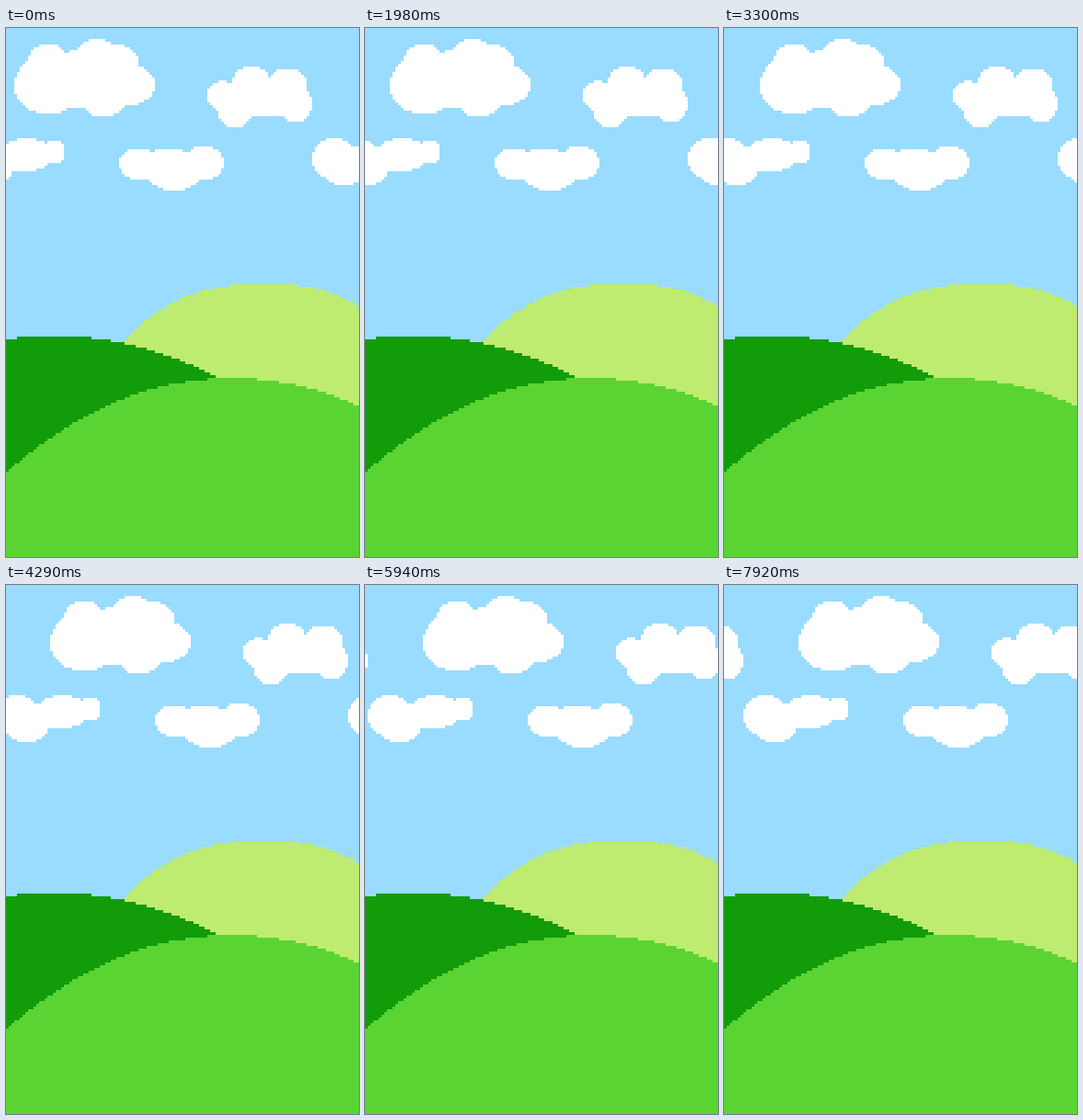
Write an HTML page with a canvas that moves like this. It is 384 by 576 pixels and loops after 8 s.

```html
<!DOCTYPE html>
<html lang="en">
<head>
<meta charset="utf-8">
<title>Drifting clouds</title>
<style>
  html, body { margin: 0; width: 100%; height: 100%; overflow: hidden; background: #99dcff; }
  canvas { display: block; width: 384px; height: 576px; image-rendering: pixelated; }
</style>
</head>
<body>
<canvas id="stage" width="128" height="192"></canvas>
<script>
const CELL = 3, COLS = 128, ROWS = 192;
const STEP_MS = 330, LOOP_MS = 8000;

// Each cloud is a union of puffs: centre x, centre y, radius x, radius y.
const clouds = [
  [[46, 62, 37, 32], [46, 38, 22, 21], [75, 56, 30, 31], [100, 38, 27, 26],
   [124, 40, 21, 21], [135, 62, 27, 22], [106, 74, 26, 23]],
  [[236, 74, 17, 16], [249, 86, 20, 23], [267, 63, 22, 21],
   [306, 63, 22, 19.5], [315, 82, 18, 21], [280, 78, 42, 19]],
  [[144, 148, 21, 17], [176, 147, 28, 16], [215, 147, 22, 19], [183, 158, 30, 19]],
  [[358, 143, 25, 23], [368, 156, 22, 15], [383, 143, 30, 15],
   [406, 138, 28, 18], [436, 135, 12, 13]]
];

// A hill falls by `drop` at a distance of `reach` from its crest, from back to front.
const hills = [
  { color: '#beec70', crest: 280, top: 278.6, reach: 154, drop: 64, power: 2.5 },
  { color: '#129c0a', crest: 52, top: 335.3, reach: 182, drop: 46.7, power: 2 },
  { color: '#5ad432', crest: 246, top: 381.5, reach: 246, drop: 103, power: 2.1 }
];

const inPuff = (x, y) => ([cx, cy, rx, ry]) => ((x - cx) / rx) ** 2 + ((y - cy) / ry) ** 2 < 1;
const hillTop = (hill, x) =>
  hill.top + hill.drop * (Math.abs(x - hill.crest) / hill.reach) ** hill.power;

function makeLayer() {
  const canvas = document.createElement('canvas');
  canvas.width = COLS;
  canvas.height = ROWS;
  return canvas;
}

// Fills every cell whose centre is inside; shapes past the right edge wrap to the left.
function fillCells(layer, color, isInside) {
  const ctx = layer.getContext('2d');
  ctx.fillStyle = color;
  for (let y = 0; y < ROWS; y++)
    for (let x = 0; x < COLS * 2; x++)
      if (isInside((x + 0.5) * CELL, (y + 0.5) * CELL)) ctx.fillRect(x % COLS, y, 1, 1);
}

const cloudLayer = makeLayer(), hillLayer = makeLayer();
for (const puffs of clouds)
  fillCells(cloudLayer, '#fff', (x, y) => puffs.some(inPuff(x, y)));
for (const hill of hills)
  fillCells(hillLayer, hill.color, (x, y) => x < COLS * CELL && y > hillTop(hill, x));

const stage = document.getElementById('stage').getContext('2d');
const start = performance.now();

function draw() {
  const time = (performance.now() - start) % LOOP_MS;
  const shift = Math.floor(time / STEP_MS);
  stage.fillStyle = '#99dcff';
  stage.fillRect(0, 0, COLS, ROWS);
  stage.drawImage(cloudLayer, shift, 0);
  stage.drawImage(cloudLayer, shift - COLS, 0);
  stage.drawImage(hillLayer, 0, 0);
  requestAnimationFrame(draw);
}
draw();
</script>
</body>
</html>
```
